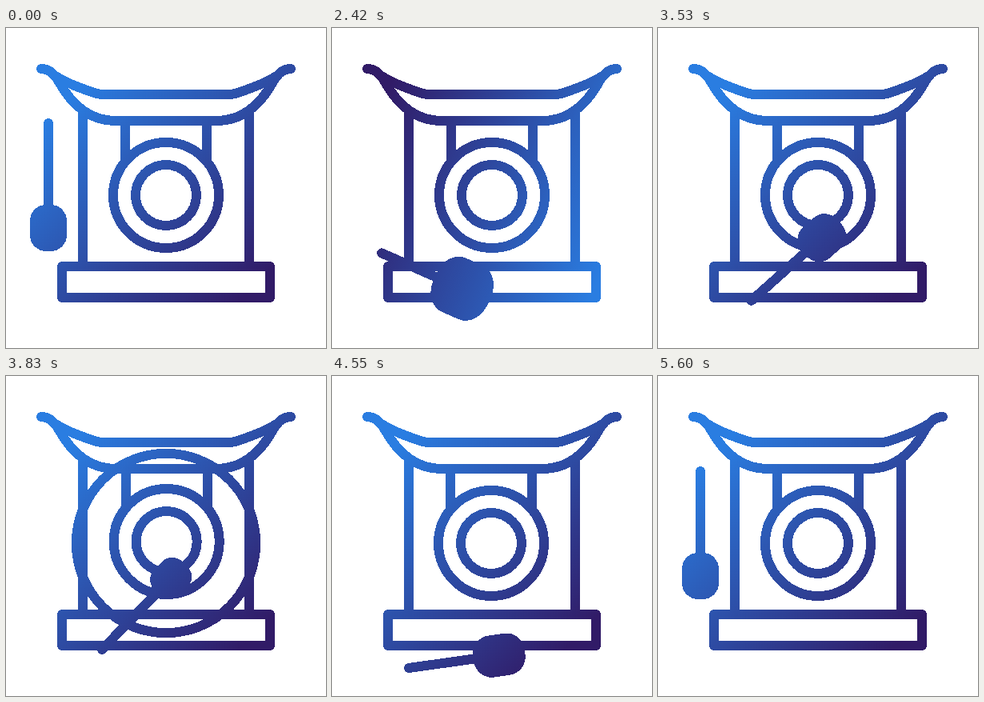
An HTML page without scripts that plays this animation: 400x400 px, repeating every 5.63 s.

```html
<!DOCTYPE html>
<html lang="en">
<head>
<meta charset="utf-8">
<title>Gong</title>
<style>
html, body { margin: 0; width: 100%; height: 100%; overflow: hidden; background: #fff; }
svg { display: block; width: 100vw; height: 100vh; }

.line { fill: none; stroke: #fff; stroke-width: 12; stroke-linecap: round; stroke-linejoin: round; }
.butt { stroke-linecap: butt; }
.solid { fill: #fff; stroke: none; }
#art { shape-rendering: crispEdges; }

.paint, .gong, .wave, .mallet, .head { animation: 5630ms linear infinite; }
.paint { transform-origin: 200px 200px; animation-name: turn; }
.gong { animation-name: shake; }
.wave { animation-name: spread; }
.mallet { animation-name: swing; }
.head { animation-name: depth; }

/* the colour sweep makes one full turn */
@keyframes turn {
  0%, 35.5% { transform: rotate(45deg); animation-timing-function: cubic-bezier(.45, 0, .75, .7); }
  42.98% { transform: rotate(200deg); animation-timing-function: cubic-bezier(.25, .35, .65, .9); }
  52.58% { transform: rotate(385deg); animation-timing-function: ease-out; }
  56.3%, 100% { transform: rotate(405deg); }
}

@keyframes shake {
  0%, 64.3% { transform: translate(0, 0); animation-timing-function: ease-out; }
  65.9% { transform: translate(.3px, -3px); }
  68.03% { transform: translate(.7px, -2px); animation-timing-function: ease-in-out; }
  74% { transform: translate(1px, 0); animation-timing-function: ease-in-out; }
  80.82% { transform: translate(-1px, 0); animation-timing-function: ease-in-out; }
  88% { transform: translate(.6px, 0); animation-timing-function: ease-in-out; }
  95%, 100% { transform: translate(0, 0); }
}

@keyframes spread {
  0%, 64.29% { r: 66px; stroke-width: 0; }
  64.3% { r: 66px; stroke-width: 12px; }
  65.9% { r: 82px; stroke-width: 12px; }
  68.03% { r: 112px; stroke-width: 12px; }
  71.05% { r: 142px; stroke-width: 9.5px; }
  76.02% { r: 166.5px; stroke-width: 3px; }
  78.69%, 100% { r: 170px; stroke-width: 0; }
}

/* position of the handle tip, and the handle direction */
@keyframes swing {
  0%, 35.5% { transform: translate(53px, 119px) rotate(90deg); animation-timing-function: cubic-bezier(.45, 0, .75, .7); }
  42.98% { transform: translate(62px, 281px) rotate(24deg); animation-timing-function: cubic-bezier(.2, .4, .6, .95); }
  52.58% { transform: translate(98px, 367px) rotate(-14deg); }
  55.77% { transform: translate(102px, 368px) rotate(-16deg); animation-timing-function: cubic-bezier(.5, 0, .8, .8); }
  64.3% { transform: translate(122px, 331px) rotate(-51deg); animation-timing-function: ease-in-out; }
  68.03% { transform: translate(120px, 342px) rotate(-46deg); animation-timing-function: cubic-bezier(.3, .3, .5, 1); }
  80.82% { transform: translate(96px, 365px) rotate(-8deg); animation-timing-function: cubic-bezier(.45, 0, .75, .7); }
  86.68% { transform: translate(64px, 272px) rotate(28deg); animation-timing-function: cubic-bezier(.2, .4, .4, 1); }
  99.47%, 100% { transform: translate(53px, 119px) rotate(90deg); }
}

/* distance of the head from the tip, and its size */
@keyframes depth {
  0%, 35.5% { transform: translate(131px, 0) scale(1, 1); animation-timing-function: cubic-bezier(.4, 0, .75, .7); }
  42.98% { transform: translate(110px, 0) scale(1.28, 1.6); animation-timing-function: cubic-bezier(.2, .4, .6, .95); }
  52.58% { transform: translate(99px, 0) scale(1.6, 1.62); }
  55.77% { transform: translate(99px, 0) scale(1.6, 1.62); animation-timing-function: cubic-bezier(.5, 0, .8, .8); }
  64.3% { transform: translate(125px, 0) scale(.82, .92); }
  68.03% { transform: translate(124px, 0) scale(.87, .97); animation-timing-function: ease-out; }
  80.82% { transform: translate(114px, 0) scale(1.12, 1.14); animation-timing-function: ease-in; }
  86.68% { transform: translate(119px, 0) scale(1.1, 1.16); animation-timing-function: ease-out; }
  99.47%, 100% { transform: translate(131px, 0) scale(1, 1); }
}
</style>
</head>
<body>
<svg viewBox="0 0 400 400">
  <defs>
    <linearGradient id="ink">
      <stop offset=".225" stop-color="#2a7de1"/>
      <stop offset=".775" stop-color="#311b67"/>
    </linearGradient>

    <g id="side" class="line">
      <path d="M44 51C54 51 60 57 66 67C82 96 104 116 137 116H200"/>
      <path d="M62 60C72 67 90 74 106 79.5Q115 83 121 83H200"/>
      <path class="butt" d="M96 104V298"/>
    </g>

    <mask id="art" maskUnits="userSpaceOnUse" x="0" y="0" width="400" height="400">
      <use href="#side"/>
      <use href="#side" transform="matrix(-1 0 0 1 400 0)"/>
      <rect class="line" x="70" y="298" width="260" height="39"/>
      <g class="line gong">
        <path class="butt" d="M149 118V167M251 118V167"/>
        <circle cx="200" cy="209" r="66"/>
        <circle cx="200" cy="209" r="38"/>
      </g>
      <circle class="line wave" cx="200" cy="209" r="66"/>
      <g class="mallet">
        <path class="line" d="M0 0H100"/>
        <rect class="solid head" x="-29" y="-23" width="58" height="46" rx="20"/>
      </g>
    </mask>
  </defs>

  <g mask="url(#art)">
    <rect class="paint" x="-100" y="-100" width="600" height="600" fill="url(#ink)"/>
  </g>
</svg>
</body>
</html>
```
